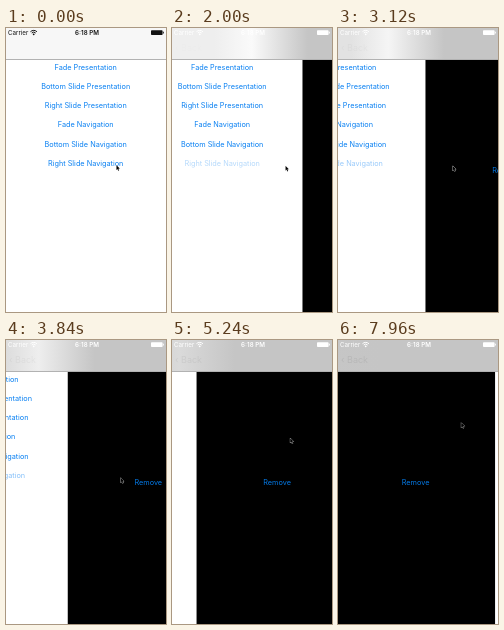
An HTML page with a canvas for the animation above (8 s loop, 160 by 284 pixels).

```html
<!DOCTYPE html>
<html lang="en">
<head>
<meta charset="utf-8">
<style>
  html, body { margin: 0; width: 100%; height: 100%; overflow: hidden; background: #fff; }
  canvas { display: block; width: 160px; height: 284px; }
</style>
</head>
<body>
<canvas></canvas>
<script>
const W = 160, H = 284, BAR = 32, LOOP = 8000;
const PRESS = 520, START = 680;
const BLUE = '#0a80f2';
const FONT = 'Inter, Roboto, sans-serif';
const ITEMS = ['Fade Presentation', 'Bottom Slide Presentation', 'Right Slide Presentation',
  'Fade Navigation', 'Bottom Slide Navigation', 'Right Slide Navigation'];
// time, x, y of the pointer tip
const POINTER = [[0, 110.5, 137.3], [320, 110.5, 137.3], [360, 111.5, 137.6], [1400, 111.8, 137.8],
  [2400, 114.8, 138], [3900, 114.8, 137.8], [5240, 118.3, 98.2], [5640, 123.3, 82.8], [LOOP, 123.3, 82.8]];

const canvas = document.querySelector('canvas');
const ctx = canvas.getContext('2d');
const scale = window.devicePixelRatio || 1;
canvas.width = W * scale;
canvas.height = H * scale;

const mix = (a, b, k) => a + (b - a) * k;
const gray = v => `rgb(${v},${v},${v})`;

function rect(x, y, w, h, color) {
  ctx.fillStyle = color;
  ctx.fillRect(x, y, w, h);
}

function text(label, x, y, size, color, align = 'center', weight = 400) {
  ctx.font = `${weight} ${size}px ${FONT}`;
  ctx.textAlign = align;
  ctx.textBaseline = 'alphabetic';
  ctx.fillStyle = color;
  ctx.fillText(label, x, y);
}

// Underdamped spring carrying the incoming screen from the right edge to 0
function panelEdge(t) {
  if (t <= START) return W;
  const rate = 5.55e-4, damping = 0.75;
  const decay = damping * rate, freq = rate * Math.sqrt(1 - damping ** 2);
  const s = t - START;
  return W * Math.exp(-decay * s) * (Math.cos(freq * s) + decay / freq * Math.sin(freq * s));
}

function pointerAt(t) {
  const i = POINTER.findIndex(p => p[0] > t);
  const a = POINTER[i - 1], b = POINTER[i];
  const k = (t - a[0]) / (b[0] - a[0]);
  return [mix(a[1], b[1], k), mix(a[2], b[2], k)];
}

function pressedAlpha(t) {
  if (t < PRESS) return 1;
  return 0.2 + 0.8 * (Math.max(0, t - START) / (LOOP - START)) ** 1.2;
}

function drawScreens(t, edge) {
  rect(0, 0, W, H, '#fff');
  rect(edge, BAR, W, H - BAR, '#000');
  ITEMS.forEach((label, i) => {
    ctx.globalAlpha = i === ITEMS.length - 1 ? pressedAlpha(t) : 1;
    text(label, edge - 80.3, 42.1 + i * 19.1, 7.3, BLUE);
  });
  ctx.globalAlpha = 1;
  text('Remove', edge + 80.5, 144.7, 7.3, '#0478e4');
}

// The translucent bar blurs the moving boundary between the two screens
function drawBar(t, edge) {
  if (t < START) {
    rect(0, 0, W, BAR, '#f7f7f7');
  } else {
    const progress = Math.min(1, 1 - edge / W);
    const center = edge + mix(-32, 18, progress);
    const blur = ctx.createLinearGradient(center - 65, 0, center + 28, 0);
    const light = mix(250, 198, progress ** 3);
    blur.addColorStop(0, gray(mix(247, 200, progress)));
    blur.addColorStop(0.4, gray(light));
    blur.addColorStop(1, gray(197));
    rect(0, 0, W, BAR, blur);
    text('‹ Back', 3, 23, 9, `rgba(0,0,0,${0.07 * progress})`, 'left');
  }
  rect(0, BAR - 1, W, 1, '#b2b2b2');
}

function drawStatus(color) {
  text('Carrier', 2, 7, 6.2, color, 'left');
  text('6:18 PM', 81, 7, 6.2, color, 'center', 600);
  ctx.strokeStyle = color;
  ctx.lineWidth = 1;
  for (const r of [2.8, 4.6]) {
    ctx.beginPath();
    ctx.arc(27.7, 7, r, -Math.PI * 0.75, -Math.PI * 0.25);
    ctx.stroke();
  }
  ctx.fillStyle = color;
  ctx.beginPath();
  ctx.arc(27.7, 6.3, 0.9, 0, Math.PI * 2);
  ctx.fill();
  ctx.beginPath();
  ctx.roundRect(145, 2.2, 11.6, 4.8, 0.8);
  ctx.fill();
  rect(157, 3.7, 0.8, 1.8, color);
}

function drawPointer([x, y]) {
  ctx.beginPath();
  [[0, 0], [0, 4.7], [1, 3.7], [1.8, 5.5], [2.5, 5.1], [1.8, 3.4], [3.2, 3.3]]
    .forEach(([dx, dy]) => ctx.lineTo(x + dx, y + dy));
  ctx.closePath();
  ctx.strokeStyle = '#ddd';
  ctx.lineWidth = 0.7;
  ctx.stroke();
  ctx.fillStyle = '#000';
  ctx.fill();
}

function draw(now) {
  const t = now % LOOP;
  const edge = panelEdge(t);
  ctx.setTransform(scale, 0, 0, scale, 0, 0);
  drawScreens(t, edge);
  drawBar(t, edge);
  drawStatus(t < START ? '#111' : '#fff');
  drawPointer(pointerAt(t));
}

const begin = performance.now();
function loop() {
  draw(performance.now() - begin);
  requestAnimationFrame(loop);
}
loop();
</script>
</body>
</html>
```
